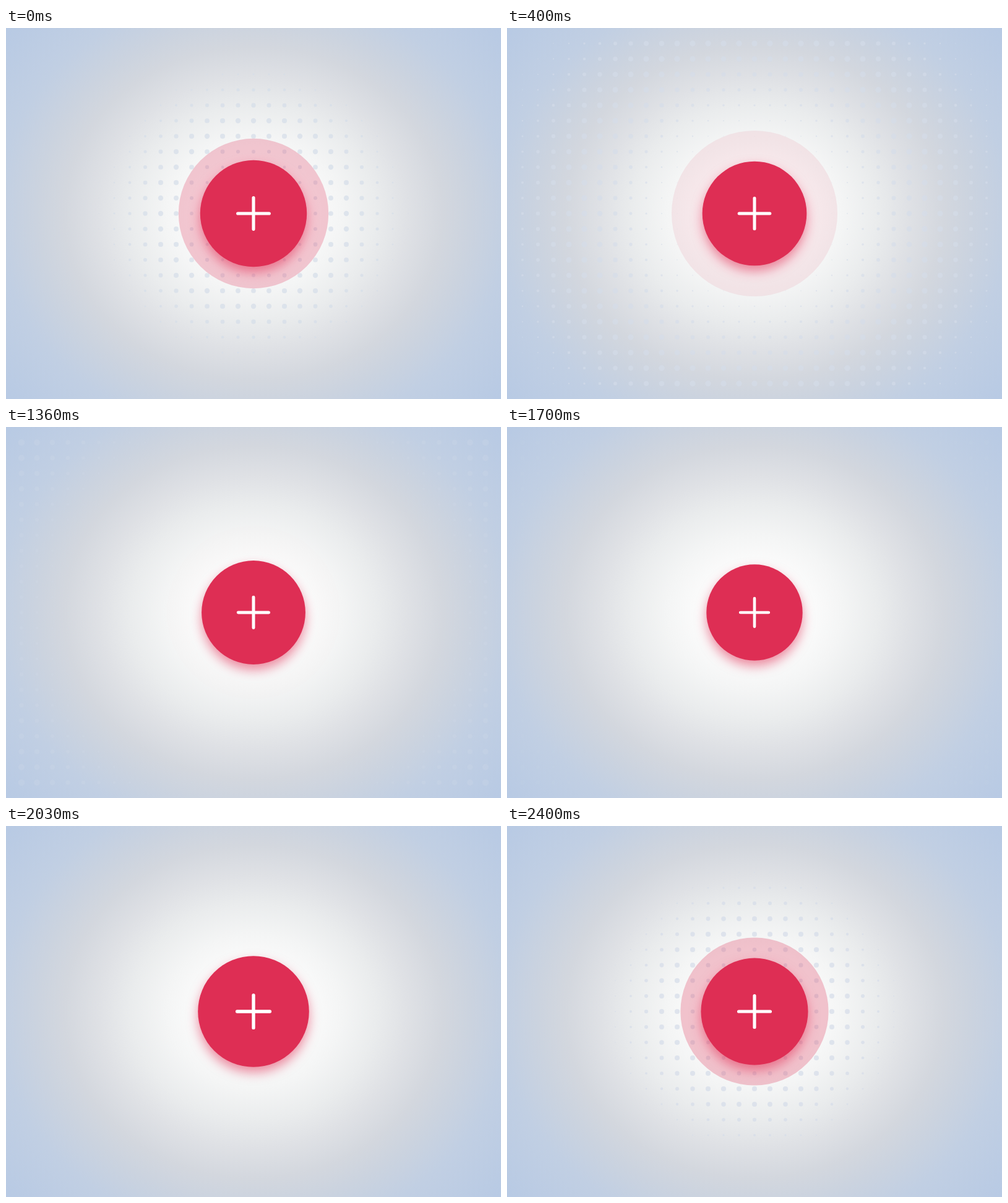
An HTML page with a canvas for the animation above (2.43 s loop, 800 by 600 pixels).

```html
<!DOCTYPE html>
<html lang="en">
<head>
<meta charset="utf-8">
<title>Pulsing add button</title>
<style>
  html, body { margin: 0; width: 100%; height: 100%; overflow: hidden; }
  body {
    background: radial-gradient(566px 500px at 400px 300px,
      #fff, #fbfbfb 16%, #f4f5f5 25%, #eaeced 35%, #dfe1e5 44%,
      #d3d7de 54%, #cbd3df 62%, #c1cfe3 73%, #b8cae4 92%);
  }
  canvas { display: block; }
</style>
</head>
<body>
<canvas id="stage" width="800" height="600"></canvas>
<script>
const ctx = document.getElementById('stage').getContext('2d');
const LOOP = 2430, RIPPLE = 2050, POP = 2110;
const CX = 400, CY = 300, GAP = 25, RADIUS = 84;
const PULSE = [[780, 1], [1080, 0.9], [1380, 1], [1860, 0.9], [POP, 1.12]];

const since = (start, t) => (t - start + LOOP) % LOOP;
const color = (rgb, alpha) => `rgba(${rgb}, ${Math.max(0, alpha)})`;
const RED = '222, 46, 84', PALE = '213, 221, 233';

function disc(x, y, r, fill) {
  ctx.fillStyle = fill;
  ctx.beginPath();
  ctx.arc(x, y, r, 0, 2 * Math.PI);
  ctx.fill();
}

// Two dips and a pop, then a decay back to rest.
function buttonScale(t) {
  const i = PULSE.findIndex(([time]) => t < time);
  if (i < 1) return 1 + 0.12 * Math.exp(-since(POP, t) / 210);
  const [t0, s0] = PULSE[i - 1], [t1, s1] = PULSE[i];
  const ease = (1 - Math.cos(Math.PI * (t - t0) / (t1 - t0))) / 2;
  return s0 + (s1 - s0) * ease;
}

// A grid of dots that swell where the wave front passes.
function drawDots(age) {
  const front = 720 * (1 - Math.exp((50 - age) / 1450));
  const width = 48 + 0.2 * front, size = 3.6 + front / 260;
  const fill = color(PALE, 0.77 * (1 - (age / 2200) ** 1.5));
  for (let x = GAP; x < 800; x += GAP) {
    for (let y = GAP; y < 600; y += GAP) {
      const off = (Math.hypot(x - CX, y - CY) - front) / width;
      const r = size * Math.exp(-off * off);
      if (r > 0.4) disc(x, y, r, fill);
    }
  }
}

function drawRing(age) {
  const r = 141.5 - 52.5 * Math.exp(-age / 400);
  disc(CX, CY, r, color(RED, (141 - r) * 0.0125));
}

function drawButton(scale) {
  ctx.save();
  ctx.translate(CX, CY);
  ctx.scale(scale, scale);
  ctx.shadowColor = color(RED, 0.55);
  ctx.shadowBlur = 18;
  ctx.shadowOffsetY = 9;
  disc(0, 0, RADIUS, color(RED, 1));

  ctx.shadowColor = 'transparent';
  ctx.strokeStyle = '#fff';
  ctx.lineWidth = 5;
  ctx.lineCap = 'round';
  ctx.beginPath();
  ctx.moveTo(-24.7, 0);
  ctx.lineTo(24.7, 0);
  ctx.moveTo(0, -24.7);
  ctx.lineTo(0, 24.7);
  ctx.stroke();
  ctx.restore();
}

let begin;
function frame(now) {
  begin ??= now;
  const t = Math.max(0, now - begin) % LOOP, age = since(RIPPLE, t);
  ctx.clearRect(0, 0, 800, 600);
  drawDots(age);
  drawRing(age);
  drawButton(buttonScale(t));
  requestAnimationFrame(frame);
}
requestAnimationFrame(frame);
</script>
</body>
</html>
```
